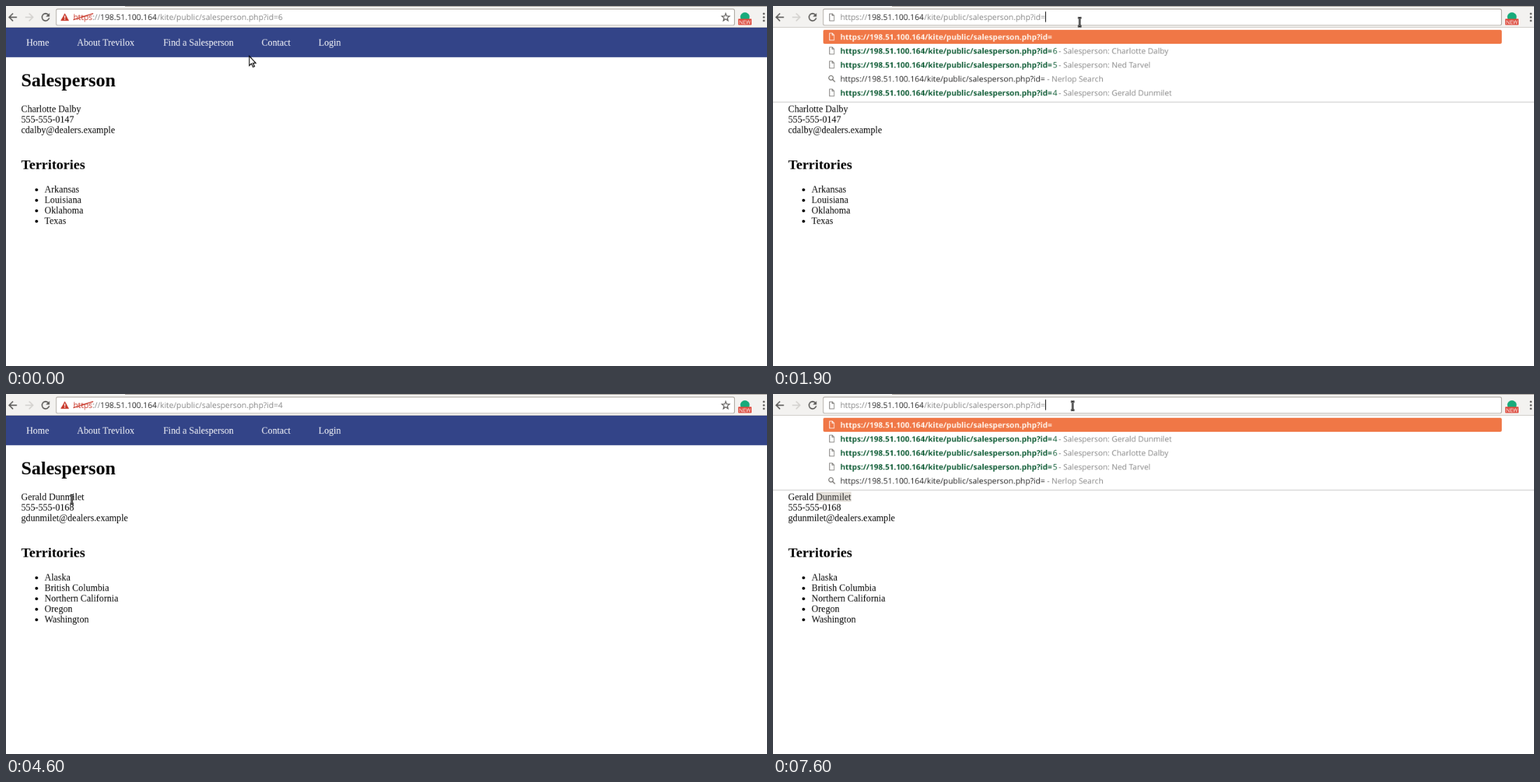
Animation of 1087x515 px, one loop 8 s. Source, as an HTML page:

```html
<!DOCTYPE html>
<html lang="en">
<head>
<meta charset="utf-8">
<title>Salesperson page</title>
<style>
  html, body { margin: 0; width: 100%; height: 100%; overflow: hidden; background: #fff; }
  /* Drawn at 6/5 size, where page text is 16px, then scaled down as one layer */
  svg { display: block; width: 1304.4px; height: 618px; transform: scale(.833333); transform-origin: 0 0; will-change: transform; }
  .page { font: 13.3333px "Liberation Serif", serif; }
  .bar { font: 11.4px "Open Sans", sans-serif; text-rendering: geometricPrecision; }
  .match { font-size: 11.1px; font-weight: bold; }
  .note { font-size: 11.2px; }
  .line { fill: none; }
</style>
</head>
<body>
<svg id="stage" viewBox="0 0 1087 515"></svg>
<script>
const stage = document.getElementById('stage');
const LOOP = 8000;
const ORANGE = '#f07746', RED = '#c9392b', GREEN = '#14603a', GREY = '#888', ICON = '#5c5b59', PAPER = '#74726f';
const HOST = '198.51.100.164', PATH = '/kite/public/salesperson.php?id=';
const ADDRESS = 'https://' + HOST + PATH;

const people = {
  4: { first: 'Gerald', last: 'Dunmilet', phone: '555-555-0168', mail: 'gdunmilet@dealers.example',
       areas: ['Alaska', 'British Columbia', 'Northern California', 'Oregon', 'Washington'] },
  5: { first: 'Ned', last: 'Tarvel' },
  6: { first: 'Charlotte', last: 'Dalby', phone: '555-555-0147', mail: 'cdalby@dealers.example',
       areas: ['Arkansas', 'Louisiana', 'Oklahoma', 'Texas'] }
};

// Pointer path: time, x, y
const track = [
  [0, 347, 71], [100, 395, 44], [200, 437, 21], [300, 437, 21], [400, 437, 22], [500, 438, 23],
  [3900, 438, 23], [4100, 380, 45], [4400, 120, 140], [4600, 94, 151],
  [5400, 94, 151], [5500, 112, 146], [5900, 405, 39.5], [6300, 428, 17], [LOOP, 428, 17]
];

const within = (t, a, b) => t >= a && t < b;
const text = (x, y, s, fill = '#000', extra = '') => `<text x="${x}" y="${y}" fill="${fill}" ${extra}>${s}</text>`;
const rect = (x, y, w, h, fill, extra = '') =>
  `<rect x="${x}" y="${y}" width="${w}" height="${h}" fill="${fill}" ${extra}/>`;
const line = (d, color, width = 1, extra = '') =>
  `<path class="line" d="${d}" stroke="${color}" stroke-width="${width}" ${extra}/>`;
const span = (s, fill) => `<tspan fill="${fill}">${s}</tspan>`;

const sheet = (y, color) =>
  line(`M80.7 ${y - 5}h4l2.5 2.5v7.5h-6.5zM84.5 ${y - 5}v2.7h2.7`, color, 0.9);
const lens = y =>
  `<circle class="line" cx="82.8" cy="${y - 1.2}" r="3.1" stroke="${PAPER}" stroke-width="1.2"/>` +
  line(`M85.1 ${y + 1.1}l3.5 3.5`, PAPER, 1.4);

function page(id, mark) {
  const p = people[id];
  let s = rect(0, 30.83, 1087, 42.5, '#334488');
  const links = [[29, 'Home'], [101.5, 'About Trevilox'], [224.5, 'Find a Salesperson'], [365, 'Contact'], [446.5, 'Login']];
  for (const [x, label] of links) s += text(x, 56.67, label, '#fff');
  s += text(21.67, 115, 'Salesperson', '#000', 'font-size="26.6667" font-weight="bold"');
  if (mark) s += rect(61.67, 140, 50, 14.17, mark);
  const lastFill = mark === ORANGE ? '#fff' : mark ? '#323232' : '#000';
  s += text(21.67, 151.67, p.first + ' ' + span(p.last, lastFill));
  s += text(21.67, 166.67, p.phone) + text(21.67, 181.67, p.mail);
  s += text(21.67, 233.33, 'Territories', '#000', 'font-size="20" font-weight="bold"');
  p.areas.forEach((area, i) => {
    const y = 266.67 + 15 * i;
    s += `<circle cx="43.6" cy="${y - 3.75}" r="2.1"/>` + text(55, y, area);
  });
  return `<g class="page">${s}</g>`;
}

function toolbar(digit, editing, selected, caret, star) {
  let s = rect(0, 0, 1087, 30.83, '#f3f2f0') + rect(170, 0, 917, 0.83, '#a29d96') + rect(0, 30, 1087, 0.83, '#cbc8c3');
  s += line('M15.5 16H5M10 10.5L4.5 16L10 21.5', ICON, 1.7);
  s += line('M27.5 16H38M33 10.5L38.5 16L33 21.5', '#d4d2cf', 1.7);
  s += line('M60.6 12.6A5.2 5.2 0 1 0 61.7 17', ICON, 1.7) + `<path d="M62.2 10v5.2H57z" fill="${ICON}"/>`;
  s += rect(71.67, 4.5, 968.8, 23, '#fff', 'rx="2" stroke="#aaa59e"');

  if (editing) s += sheet(16, PAPER);
  else s += `<path d="M84 10.2L90 21H78z" fill="${RED}"/>` + rect(83.3, 13.8, 1.4, 3.6, '#fff') + rect(83.3, 18.3, 1.4, 1.4, '#fff');

  if (selected) s += rect(96, 8, 300, 15, ORANGE);
  const ink = c => selected ? '#fff' : c;
  s += text(96, 20, span('https', ink(editing ? GREY : RED)) + span('://', ink(GREY)), GREY);
  s += text(134.7, 20, HOST, ink('#262626')) + text(215.8, 20, PATH + digit, ink(GREY));
  if (!editing) s += line('M96 19.8L124.5 10.8', ink(RED), 1.5);
  if (caret) s += rect(digit ? 396 : 389, 8, 1, 15, '#000');

  if (star) {
    let d = '';
    for (let i = 0; i < 10; i++) {
      const r = i % 2 ? 2.4 : 5.8, a = i * Math.PI / 5;
      d += (i ? 'L' : 'M') + (1028 + r * Math.sin(a)).toFixed(1) + ' ' + (16.3 - r * Math.cos(a)).toFixed(1);
    }
    s += line(d + 'Z', ICON, 1.2);
  }
  s += '<circle cx="1055.5" cy="15.7" r="6.6" fill="#17ab7b"/>' + rect(1045.8, 18.3, 19.2, 8.7, '#dd4b3e', 'rx="1"');
  s += text(1055.4, 25.5, 'NEW', '#fff', 'font-size="7.6" text-anchor="middle"');
  for (const y of [11, 16, 21]) s += `<circle cx="1082.5" cy="${y}" r="1.5" fill="${ICON}"/>`;
  return s;
}

// Each row is a page id, '' for the bare address or '?' for a web search; the first is highlighted.
function suggestions(rows, digit) {
  const end = 37.5 + 20 * rows.length;
  let s = rect(0, 30.83, 1087, end - 30.83, '#fff') + rect(71.67, 34.17, 969.2, 20, ORANGE, 'rx="2"');
  ['#cfcfcf', '#e8e8e8', '#f7f7f7'].forEach((c, i) => s += rect(0, end - 0.83 + i * 0.83, 1087, 0.83, c));
  rows.forEach((id, i) => {
    const mid = 44 + 20 * i, y = mid + 4, top = i === 0;
    if (id === '?') {
      s += lens(mid) + text(96, y, ADDRESS + digit, '#262626');
      s += text(digit ? 398.5 : 391.5, y, '- Nerlop Search', GREY, 'class="note"');
      return;
    }
    s += sheet(mid, top ? '#fff' : PAPER);
    s += text(96, y, ADDRESS + (top ? id : ''), top ? '#fff3ea' : GREEN, 'class="match"');
    if (!id) return;
    if (!top) s += text(399.5, y, id, GREEN);
    const { first, last } = people[id];
    s += text(408, y, `- Salesperson: ${first} ${last}`, top ? '#fff' : GREY, 'class="note"');
  });
  return s;
}

function pointer(t) {
  const i = track.findIndex(k => k[0] > t);
  const [t0, x0, y0] = track[i - 1], [t1, x1, y1] = track[i];
  const f = (t - t0) / (t1 - t0), x = x0 + (x1 - x0) * f, y = y0 + (y1 - y0) * f;
  const overText = y < 29 || (y > 139 && x < 113);
  let s;
  if (overText) {
    const d = 'M-2.5 -6H-1L0 -5L1 -6H2.5M0 -5V5M-2.5 6H-1L0 5L1 6H2.5';
    s = line(d, '#000', 2.8) + line(d, '#ddd', 0.8);
  } else {
    s = '<path d="M.5 .5V14.3L3.6 11.4L5.8 16.4L8 15.4L5.8 10.6H9.8Z" fill="#fff" stroke="#000" stroke-width="1.2"/>';
  }
  return `<g transform="translate(${x.toFixed(1)} ${y.toFixed(1)})">${s}</g>`;
}

function scene(t) {
  const digit = t < 1900 ? '6' : within(t, 3000, 7600) ? '4' : '';
  const editing = within(t, 1900, 3500) || t >= 7600;
  const selected = within(t, 800, 1400) || within(t, 6500, 7000);
  const caret = within(t, 1400, 2400) || within(t, 2900, 3300) || within(t, 7000, 7500) || t >= 7600;
  const mark = t < 5100 ? '' : t < 6500 ? ORANGE : '#e4e0da';
  const rows = within(t, 1900, 3000) ? ['', '6', '5', '?', '4']
    : within(t, 3000, 3100) ? ['4', '6', '5', '?', '4']
    : within(t, 3100, 3300) ? ['4', '?']
    : t >= 7600 ? ['', '4', '6', '5', '?'] : null;
  const bar = toolbar(digit, editing, selected, caret, !rows) + (rows ? suggestions(rows, digit) : '');
  return page(t < 3900 ? 6 : 4, mark) + `<g class="bar">${bar}</g>` + pointer(t);
}

let shown = -1;
function draw() {
  const t = Math.floor(performance.now() % LOOP / 100) * 100;
  if (t !== shown) stage.innerHTML = scene(shown = t);
  requestAnimationFrame(draw);
}
draw();
</script>
</body>
</html>
```
